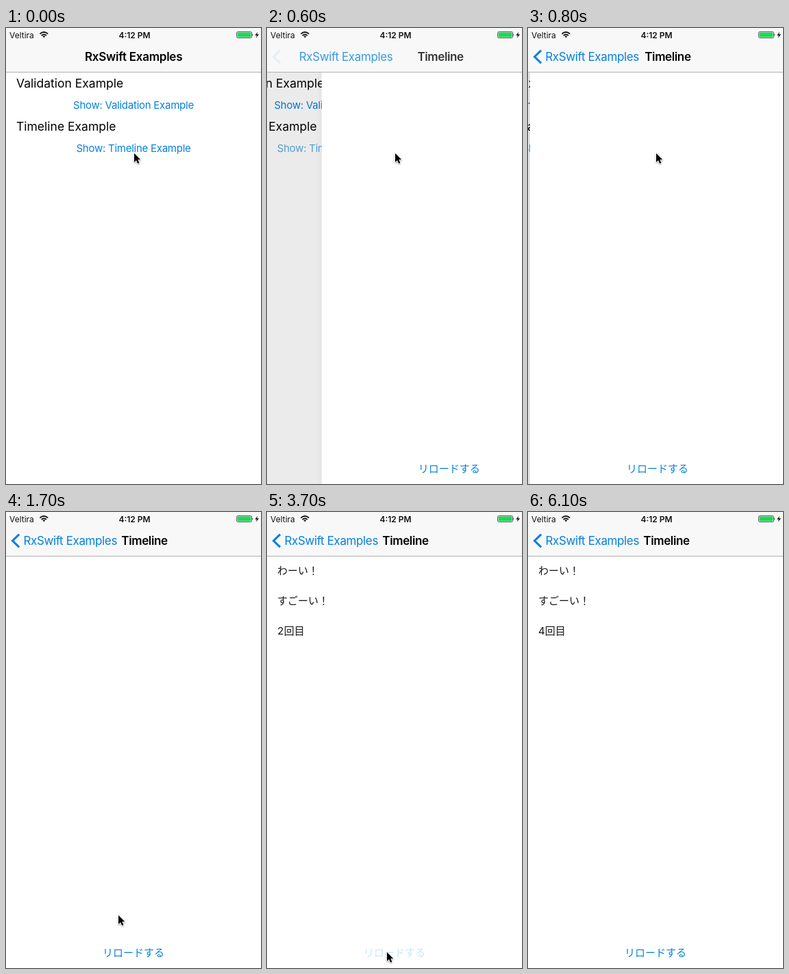
Recreate the animation shown at these times as an HTML page. Size 372 by 666 pixels, loop 6200 ms.

```html
<!DOCTYPE html>
<html lang="en">
<head>
<meta charset="utf-8">
<title>RxSwift Examples</title>
<style>
  html, body { margin: 0; width: 100%; height: 100%; overflow: hidden; background: #fff; }
  svg { display: block; width: 372px; height: 666px; }
  text { font-family: Inter, Roboto, sans-serif; white-space: pre; }
  .status { font-size: 12px; fill: #111; }
  .nav { font-size: 17px; letter-spacing: -.38px; }
  .bold { font-weight: 600; }
  #homeTitle { letter-spacing: -.25px; }
  .label { font-size: 17.5px; }
  .link { font-size: 15px; letter-spacing: -.25px; text-anchor: middle; }
  .jp {
    font: 15px Inter, "Noto Sans CJK JP", "Noto Sans CJK", sans-serif;
    font-variant-numeric: tabular-nums;
  }
  .blue { fill: #0580df; }
  .mid { text-anchor: middle; }
  #cursor { filter: drop-shadow(0 1px 1px rgba(0, 0, 0, .35)); }
</style>
</head>
<body>
<svg viewBox="0 0 372 666" lang="ja">
  <defs>
    <linearGradient id="edge">
      <stop offset="0" stop-opacity="0"/>
      <stop offset="1" stop-opacity=".025"/>
    </linearGradient>
  </defs>
  <rect width="372" height="666" fill="#fff"/>

  <g id="home">
    <text class="label" x="15" y="87">Validation Example</text>
    <text class="link blue" x="186" y="117.5">Show: Validation Example</text>
    <text class="label" x="15" y="150">Timeline Example</text>
    <text class="link blue" id="show" x="186" y="180.5">Show: Timeline Example</text>
  </g>
  <rect id="dim" y="64" width="372" height="602"/>

  <g id="page">
    <rect x="-9" y="64" width="9" height="602" fill="url(#edge)"/>
    <rect y="64" width="372" height="602" fill="#fff"/>
    <g id="rows" fill="#151515">
      <text class="jp" x="15" y="91">わーい！</text>
      <text class="jp" x="15" y="135">すごーい！</text>
      <text class="jp" id="count" x="15" y="179"></text>
    </g>
    <text class="jp blue mid" id="reload" x="186" y="649">リロードする</text>
  </g>

  <rect width="372" height="64" fill="#f8f8f8"/>
  <rect y="64" width="372" height="1" fill="#b0b0b0"/>
  <text class="status" x="5" y="14.5">Veltira</text>
  <g fill="none" stroke="#111" stroke-width="1.9">
    <path d="M49.4 8.6Q55.3 3.4 61.2 8.6"/>
    <path d="M51.7 11Q55.3 8 58.9 11"/>
  </g>
  <path d="M53.3 12.2Q55.3 10.8 57.3 12.2L55.3 14.2Z" fill="#111"/>
  <text class="status bold mid" x="187.5" y="14.5">4:12 PM</text>
  <rect x="336.5" y="5.5" width="22" height="9" rx="1.8" fill="#fff" stroke="#333" stroke-width=".8"/>
  <rect x="337.5" y="6.5" width="20" height="7" rx=".8" fill="#22d45a"/>
  <path d="M359.4 8.2q1.8 1.8 0 3.6z" fill="#222"/>
  <path d="M367 5.8L363.2 10.7H365.8L364.8 14.4L369 9.3H366.2Z" fill="#111"/>

  <path id="chevron" d="M19.2 32.6L9.6 42L19.2 51.4" fill="none" stroke="#0580df" stroke-width="3.1"/>
  <text class="nav bold" id="homeTitle" y="48">RxSwift Examples</text>
  <text class="nav blue" id="back" y="48">RxSwift Examples</text>
  <text class="nav bold mid" id="title" y="48">Timeline</text>

  <path id="cursor" d="M0 1V14L3 11.2L5.2 16L7.4 15L5.3 10.3H9.3Z"
        stroke="#fff" stroke-width="1.6" paint-order="stroke" stroke-linejoin="round"/>
</svg>
<script>
const LOOP = 6200, STEP = 100, FADE = 350;
const PUSH_START = 455, PUSH_END = 1150, PUSH_RATE = 20;

// [pressed, released] in ms
const showTaps = [[100, 405]];
const reloadTaps = [[2000, 2355], [2750, 3005], [3450, 3705], [4200, 4405]];

// [time, x, y, opacity], held until the next entry
const pointer = [
  [0, 187, 182, 1], [1600, 178, 400, 1], [1700, 164, 588, 1],
  [1900, 175, 642, 1], [5100, 175, 642, .5], [5200, 175, 642, 0]
];

const el = {};
document.querySelectorAll('svg [id]').forEach(node => el[node.id] = node);

const set = (node, attrs) => {
  for (const name in attrs) node.setAttribute(name, attrs[name]);
};
const move = (node, x, y = 0) => set(node, { transform: `translate(${x} ${y})` });
const clamp = v => Math.max(0, Math.min(1, v));
const ease = v => (1 - Math.cos(Math.PI * clamp(v))) / 2;

// Remaining share of the push, following a critically damped spring.
function pushLeft(t) {
  if (t < PUSH_START) return 1;
  if (t >= PUSH_END) return 0;
  const s = PUSH_RATE * (t - PUSH_START) / 1000;
  return (1 + s) * Math.exp(-s);
}

function buttonAlpha(taps, t) {
  const tap = taps.filter(([down]) => down <= t).pop();
  if (!tap) return 1;
  return t < tap[1] ? .2 : .2 + .8 * ease((t - tap[1]) / FADE);
}

function draw(t) {
  const left = pushLeft(t), done = 1 - left;
  move(el.home, -111.6 * done);
  move(el.page, t < PUSH_START ? 400 : 372 * left);
  set(el.dim, { opacity: .1 * done });

  set(el.chevron, { opacity: clamp(1 - 4.3 * left) });
  set(el.homeTitle, { x: 115 - 90 * done, opacity: clamp((left - .25) / .75) });
  set(el.back, { x: t < PUSH_END ? 24.5 + 104 * left : 25.5, opacity: done });
  set(el.title, { x: 202 + 238 * left, opacity: done });

  set(el.show, { opacity: buttonAlpha(showTaps, t) });
  set(el.reload, { opacity: buttonAlpha(reloadTaps, t) });
  const count = reloadTaps.filter(([, up]) => up <= t).length;
  set(el.rows, { visibility: count ? 'visible' : 'hidden' });
  el.count.textContent = count + '回目';

  const [, x, y, opacity] = pointer.filter(([time]) => time <= t).pop();
  move(el.cursor, x, y);
  set(el.cursor, { opacity });
}

const start = performance.now();
function tick() {
  const t = (performance.now() - start) % LOOP;
  draw(Math.floor(t / STEP) * STEP);
  requestAnimationFrame(tick);
}
tick();
</script>
</body>
</html>
```
